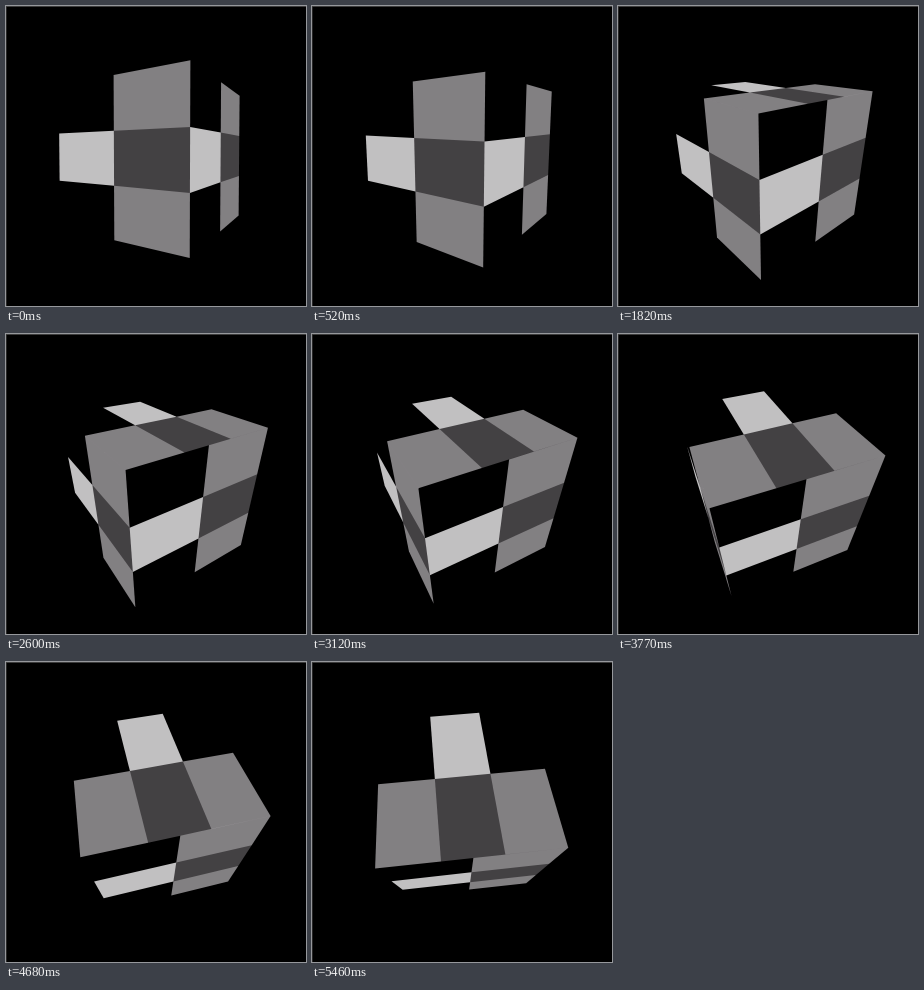
An HTML page with a canvas for the animation above (5590 ms loop, 300 by 300 pixels).

```html
<!DOCTYPE html>
<html>
<head>
<meta charset="utf-8">
<title>Turning cube</title>
<style>
html, body { margin: 0; width: 100%; height: 100%; overflow: hidden; background: #000; }
canvas { display: block; width: 300px; height: 300px; }
</style>
</head>
<body>
<canvas id="stage" width="300" height="300"></canvas>
<script>
const ctx = document.getElementById('stage').getContext('2d');
const STEP_MS = 130, STEPS = 43;
const CENTER_X = 150.8, CENTER_Y = 150.5;
const FOCAL = 150 / Math.tan(Math.PI / 6), DISTANCE = 2;
const LIGHT = '#c1c0c1', GRAY = '#828082', DARK = '#434143';
const rad = deg => deg * Math.PI / 180;

// Each face maps (u, v) in 0..1 to a point on the unit cube.
const faces = [
  (u, v) => [-0.5, 0.5 - v, 0.5 - u],
  (u, v) => [u - 0.5, 0.5 - v, -0.5],
  (u, v) => [0.5 - v, 0.5, 0.5 - u]
];

// Visible cells of the 2 by 3 pattern: column, row, colour.
const cells = [[0, 1, LIGHT], [1, 0, GRAY], [1, 1, DARK], [1, 2, GRAY]];

function projector(pitch, yaw) {
  const sp = Math.sin(pitch), cp = Math.cos(pitch);
  const sy = Math.sin(yaw), cy = Math.cos(yaw);
  return ([x, y, z]) => {
    const turnedX = x * cy - z * sy;
    const turnedZ = x * sy + z * cy;
    const scale = FOCAL / (DISTANCE + turnedZ * cp - y * sp);
    return [CENTER_X + turnedX * scale, CENTER_Y - (y * cp + turnedZ * sp) * scale];
  };
}

function facesViewer(at) {
  const [ox, oy] = at(0, 0), [ux, uy] = at(1, 0), [vx, vy] = at(0, 1);
  return (ux - ox) * (vy - oy) - (uy - oy) * (vx - ox) > 0;
}

function fillCell(at, [column, row, color]) {
  const corner = (du, dv) => at((column + du) / 2, (row + dv) / 3);
  ctx.beginPath();
  ctx.moveTo(...corner(0, 0));
  ctx.lineTo(...corner(1, 0));
  ctx.lineTo(...corner(1, 1));
  ctx.lineTo(...corner(0, 1));
  ctx.fillStyle = color;
  ctx.fill();
}

function drawBackdrop() {
  ctx.globalCompositeOperation = 'source-over';
  ctx.fillStyle = '#000';
  ctx.fillRect(0, 0, 300, 300);
  ctx.fillStyle = '#282828';
  ctx.fillRect(0, 0, 1, 300);
  ctx.fillStyle = '#3c3c3c';
  ctx.fillRect(0, 0, 300, 1);
}

function draw(step) {
  const project = projector(rad(1.5 * (step + 1)), rad(60 - 1.25 * (step + 1)));
  drawBackdrop();
  ctx.globalCompositeOperation = 'lighter'; // cells share edges without seams
  for (const face of faces) {
    const at = (u, v) => project(face(u, v));
    if (facesViewer(at)) cells.forEach(cell => fillCell(at, cell));
  }
}

const start = performance.now();
function tick() {
  draw(Math.floor((performance.now() - start) / STEP_MS) % STEPS);
  requestAnimationFrame(tick);
}
tick();
</script>
</body>
</html>
```
